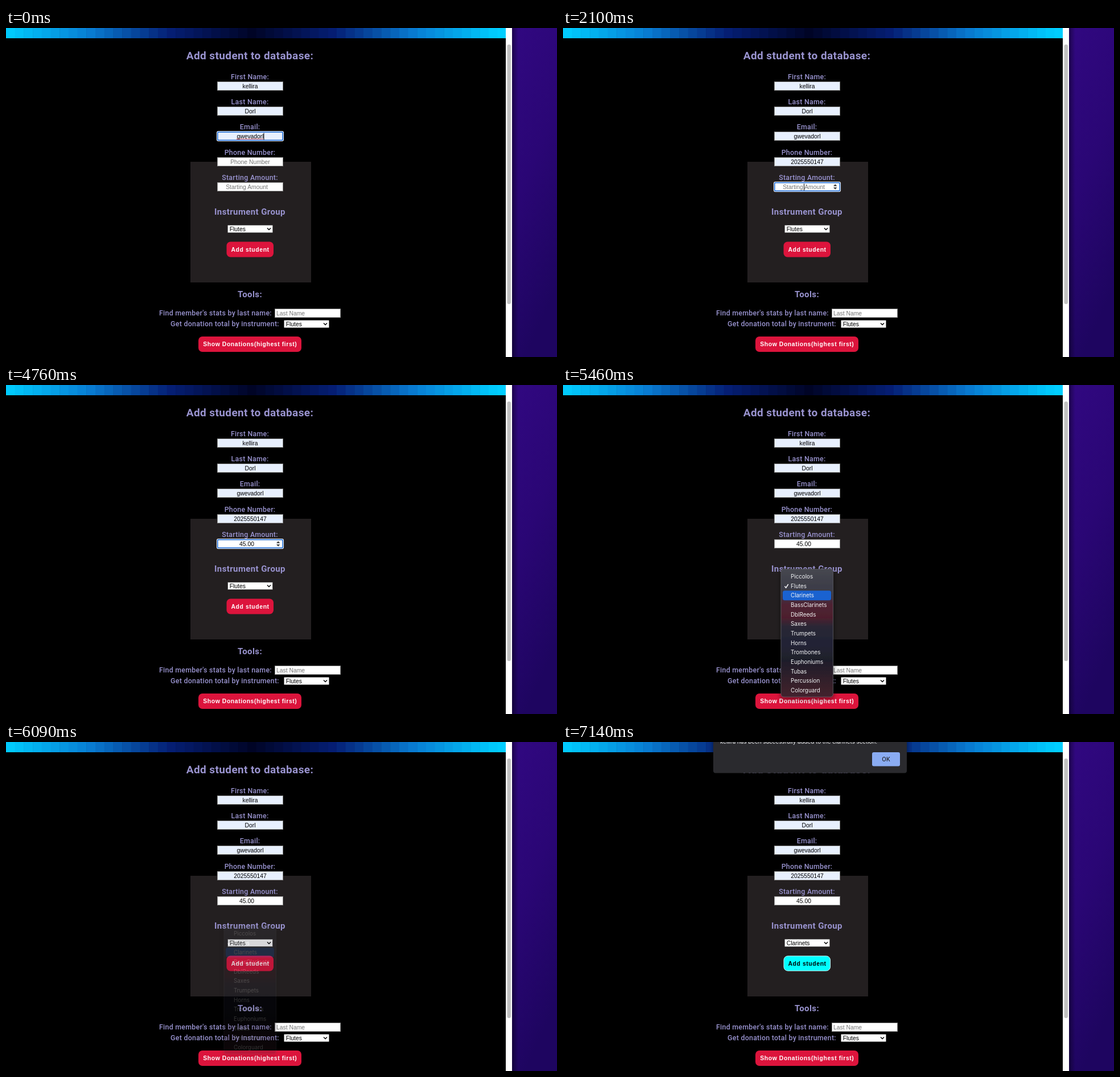
An HTML page that plays this animation: 968 by 578 pixels, repeating every 8 s.

```html
<!DOCTYPE html>
<html lang="en">
<head>
<meta charset="utf-8">
<title>Add student</title>
<style>
  html, body { margin: 0; width: 100%; height: 100%; overflow: hidden; background: #000; }
  svg { display: block; width: 968px; height: 578px; }
  text { white-space: pre; }
  .label { font: 500 12.4px Roboto, sans-serif; letter-spacing: .27px; fill: #9993cf; }
  .title { font: bold 19px Roboto, sans-serif; letter-spacing: .4px; fill: #9993cf; }
  .head { font: bold 15px Roboto, sans-serif; letter-spacing: .4px; fill: #9993cf; }
  .field { font: 10.35px "Liberation Sans", Arial, sans-serif; fill: #000; }
  .hint { fill: #757575; }
  .btn { font: bold 10.4px "Liberation Sans", Arial, sans-serif; letter-spacing: .6px; }
  .ui { font: 9.9px Inter, sans-serif; letter-spacing: -.03px; fill: #f1f3f4; }
  .mid { text-anchor: middle; }
</style>
</head>
<body>
<svg id="stage" viewBox="0 0 968 578">
  <defs>
    <linearGradient id="desk" x1="0" y1="0" x2=".3" y2="1">
      <stop offset="0" stop-color="#310881"/>
      <stop offset=".5" stop-color="#2a0675"/>
      <stop offset="1" stop-color="#1e0560"/>
    </linearGradient>
    <linearGradient id="edge">
      <stop offset="0" stop-color="#000" stop-opacity=".4"/>
      <stop offset="1" stop-color="#000" stop-opacity="0"/>
    </linearGradient>
    <linearGradient id="glass" x1="0" y1="0" x2="0" y2="1">
      <stop offset="0" stop-color="#464750"/>
      <stop offset=".2" stop-color="#393945"/>
      <stop offset=".28" stop-color="#4f2233"/>
      <stop offset=".38" stop-color="#4d1f2d"/>
      <stop offset=".45" stop-color="#2a2836"/>
      <stop offset=".58" stop-color="#212336"/>
      <stop offset=".72" stop-color="#1f1f29"/>
      <stop offset="1" stop-color="#43202d"/>
    </linearGradient>
    <filter id="shadow" x="-20%" y="-20%" width="140%" height="150%">
      <feDropShadow dx="0" dy="3" stdDeviation="4" flood-opacity=".55"/>
    </filter>
  </defs>
  <g id="page"></g>
  <g id="live"></g>
</svg>
<script>
const LOOP = 8000;
const FIRST = 'kellira', LAST = 'Dorl', MAIL = 'gwevadorl', PHONE = '2025550147';
const phones = ['555-0143', PHONE, '5', '672816', '555-0168', '404040'];
const groups = ['Piccolos', 'Flutes', 'Clarinets', 'BassClarinets', 'DblReeds', 'Saxes', 'Trumpets',
  'Horns', 'Trombones', 'Euphoniums', 'Tubas', 'Percussion', 'Colorguard'];
const FILLED = '#e8f0fe';

const rect = (x, y, w, h, fill, more = '') =>
  `<rect x="${x}" y="${y}" width="${w}" height="${h}" fill="${fill}" ${more}/>`;
const text = (x, y, cls, s, more = '') => `<text x="${x}" y="${y}" class="${cls}" ${more}>${s}</text>`;
const line = (d, color, width = 1) =>
  `<path d="${d}" fill="none" stroke="${color}" stroke-width="${width}"/>`;
const caret = (x, y) => rect(x, y + 2.5, 1, 12, '#000');

// Value of the last [time, value] step that has begun.
const at = (t, steps) => steps.reduce((v, [start, next]) => t >= start ? next : v, undefined);
const during = (t, a, b) => t >= a && t < b;

function input(y, value, { hint = '', fill = '#fff', focus = false, x = 429 } = {}) {
  const frame = focus
    ? rect(370, y - 1, 118, 18, '#fff', 'rx="3"') +
      rect(371.75, y + .75, 114.5, 14.5, fill, 'rx="1.5" stroke="#0b5fd0" stroke-width="1.5"')
    : rect(371.5, y + .5, 115, 15, fill, 'stroke="#8b8b8b"');
  return frame + text(x, y + 11.7, 'field mid' + (value ? '' : ' hint'), value || hint);
}

function select(x, y, value, border = '#767676') {
  return rect(x + .5, y + .5, 79, 13, '#fff', `rx="1" stroke="${border}"`) +
    text(x + 3.7, y + 10.7, 'field', value) +
    line(`M${x + 70} ${y + 5.5}l3 3l3 -3`, '#000', 1.5);
}

function button(x, y, w, h, label, on = false) {
  const body = on ? rect(x + .5, y + .5, w - 1, h - 1, '#0ff', 'rx="7" stroke="#c8ffff"')
    : rect(x, y, w, h, '#dc143c', 'rx="7"');
  return body + text(x + w / 2 + .3, y + h / 2 + 3.7, 'btn mid', label, `fill="${on ? '#000' : '#fff'}"`);
}

function banner() {
  const stops = [[0, 4, 38], [5, 30, 116], [8, 126, 212], [0, 206, 255]];
  let out = '';
  for (let x = 0; x < 878; x += 15.7) {
    const p = Math.min(2.999, Math.abs(x + 7.8 - 432) / 432 * 3), i = Math.floor(p);
    const rgb = stops[i].map((c, k) => Math.round(c + (stops[i + 1][k] - c) * (p - i)));
    out += rect(x, 0, Math.min(16.2, 878 - x), 18, `rgb(${rgb})`);
  }
  return out;
}

function page() {
  const labels = ['First Name:', 'Last Name:', 'Email:', 'Phone Number:', 'Starting Amount:'];
  return rect(0, 0, 878, 578, '#000') + banner() +
    rect(878, 0, 11, 578, '#fff') + rect(880.5, 29, 6.5, 456, '#c1c1c1', 'rx="3.2"') +
    rect(889, 0, 79, 578, 'url(#desk)') + rect(889, 0, 11, 578, 'url(#edge)') +
    rect(324, 235, 212, 212, '#231f20') +
    text(428.5, 55, 'title mid', 'Add student to database:') +
    labels.map((s, i) => text(428.5, 90 + i * 44.2, 'label mid', s)).join('') +
    text(428.5, 328, 'head mid', 'Instrument Group') +
    text(428.5, 473, 'head mid', 'Tools:') +
    text(269, 504.5, 'label', "Find member's stats by last name:") +
    text(289, 523.5, 'label', 'Get donation total by instrument:') +
    rect(472.5, 493.5, 115, 15, '#fff', 'stroke="#8b8b8b"') +
    text(475, 504.7, 'field hint', 'Last Name') +
    select(488, 513, 'Flutes') +
    button(338, 542, 181, 27, 'Show Donations(highest first)') +
    input(94, FIRST, { fill: FILLED }) + input(138, LAST, { fill: FILLED });
}

function email(t) {
  const focus = t < 70;
  let out = input(182, MAIL, { fill: FILLED, focus });
  if (focus) out += '<path d="M405 195.2H452" stroke="#e33" stroke-width="1.3" stroke-dasharray="1.5 1"/>' + caret(452.5, 182);
  return out;
}

function phone(t) {
  const value = at(t, [[0, ''], [700, phones[0]], [770, PHONE]]);
  let out = input(227, value, { hint: 'Phone Number', fill: value ? FILLED : '#fff', focus: during(t, 70, 2100) });
  if (during(t, 70, 700)) out += caret(428.5, 227);
  if (during(t, 1330, 1750)) out += caret(457.5, 227);
  return out;
}

function amount(t) {
  const value = at(t, [[0, ''], [3080, '4'], [3150, '45'], [3570, '45.'], [3990, '45.0'], [4130, '45.00']]);
  let out = input(271, value, { hint: 'Starting Amount', focus: during(t, 2100, 5110), x: 423 });
  if (during(t, 1820, 5110)) {
    out += '<path d="M475 278l3.2 -3.8l3.2 3.8zM475 280l3.2 3.8l3.2 -3.8z" fill="#444"/>';
  }
  if (during(t, 2100, 2590) || during(t, 3080, 4620)) {
    const width = [...value].reduce((w, c) => w + (c === '.' ? 2.88 : 5.76), 0);
    out += caret(423 + width / 2, 271);
  }
  return out;
}

function suggestions(t) {
  const alpha = at(t, [[0, 0], [140, 1], [1260, .5], [1330, 0]]);
  if (!alpha) return '';
  const pick = at(t, [[0, -1], [700, 0], [770, 1]]);
  return `<g opacity="${alpha}"><g filter="url(#shadow)"><path d="M422 251l7.5 -7l7.5 7z" fill="#2a2d2f"/>` +
    rect(413, 250, 91, 169, '#2a2d2f', 'rx="3"') + '</g>' +
    (pick < 0 ? '' : rect(413, 252.5 + pick * 27.3, 91, 27.3, '#3d4042')) +
    phones.map((s, i) => text(422, 270 + i * 27.3, 'ui', s)).join('') + '</g>';
}

function menu(t) {
  const alpha = at(t, [[0, 0], [5110, 1], [5950, .8], [6020, .5], [6090, .2], [6160, .07], [6230, 0]]);
  if (!alpha) return '';
  const pick = at(t, [[5110, 1], [5460, 2], [5810, -1], [5880, 2]]);
  const top = 328.2, row = 16.68;
  return `<g opacity="${alpha}">` +
    rect(383, 323.5, 91.5, 224.5, 'url(#glass)', 'rx="5" stroke="#5c5c64" stroke-width=".8" filter="url(#shadow)"') +
    (pick < 0 ? '' : rect(386, top + pick * row - .4, 85, 17, '#1a62d0', 'rx="3.5"')) +
    line('M389.5 353.5l2.2 2.8l4 -6.3', '#fff', 1.4) +
    groups.map((s, i) => text(400, top + 11.8 + i * row, 'ui', s)).join('') + '</g>';
}

function dialog(t) {
  const alpha = at(t, [[0, 0], [6930, .25], [7000, .55], [7070, .85], [7140, 1]]);
  if (!alpha) return '';
  return `<g opacity="${alpha}">` + rect(264, -60, 340, 114.5, '#292c2f', 'rx="4" filter="url(#shadow)"') +
    text(276, 2.5, 'ui', FIRST + ' has been successfully added to the clarinets section.') +
    rect(543, 18, 49, 24.5, '#8aacf3', 'rx="3"') +
    text(567.5, 33.8, 'ui mid', 'OK', 'style="fill:#202124;font-weight:500"') + '</g>';
}

function live(t) {
  const done = t >= 6230;
  return email(t) + phone(t) + amount(t) +
    select(389, 346, done ? 'Clarinets' : 'Flutes', during(t, 4760, 6720) ? '#4f4f4f' : '#767676') +
    button(387.5, 375.5, 82.5, 27, 'Add student', done) +
    suggestions(t) + menu(t) + dialog(t);
}

document.getElementById('page').innerHTML = page();
const layer = document.getElementById('live');
const start = performance.now();
let shown = '';

function draw(now) {
  const next = live(Math.max(0, now - start) % LOOP);
  if (next !== shown) layer.innerHTML = shown = next;
  requestAnimationFrame(draw);
}
draw(start);
</script>
</body>
</html>
```
